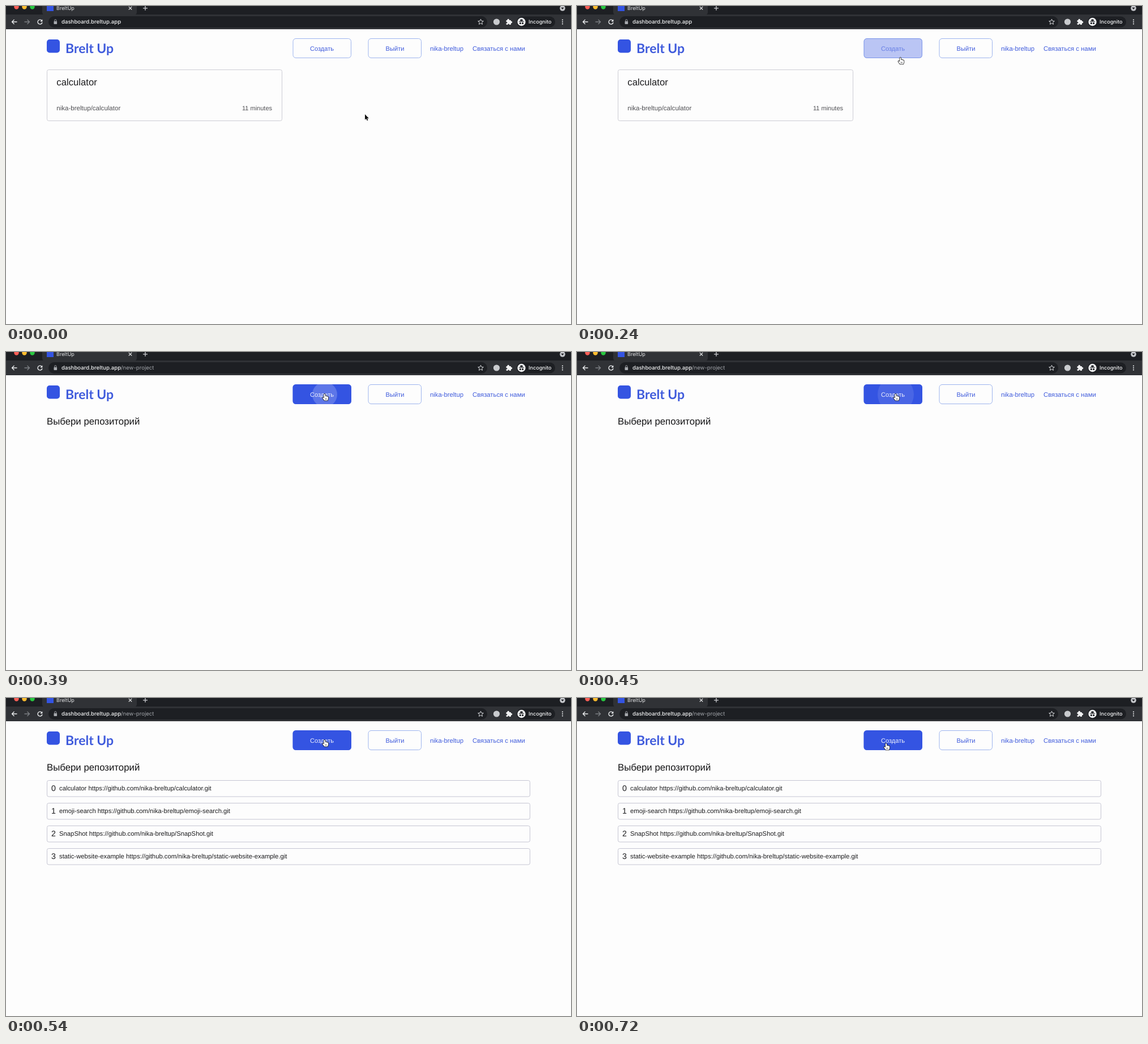
These frames come from a looping animation (998 by 561 pixels, 0.75 s). An HTML page with a canvas:

```html
<!DOCTYPE html>
<html lang="ru">
<head>
<meta charset="utf-8">
<title>Dashboard</title>
<style>
html, body { margin: 0; width: 100%; height: 100%; overflow: hidden; background: #fdfdfd; }
canvas { display: block; }
</style>
</head>
<body>
<canvas id="stage" width="998" height="561"></canvas>
<script>
const ctx = document.getElementById('stage').getContext('2d');
ctx.textRendering = 'geometricPrecision';

const LOOP = 750, STEP = 30;
const HOVER = 240, PRESS = 330, NAVIGATE = 360, LOADED = 540;
const BLUE = '#3454e2', LINK = '#3f5bdc', PAGE = '#fdfdfd';
const SANS = '"Liberation Sans", Arial, sans-serif';
const UI = 'Inter, Roboto, sans-serif';

// Pointer hot spot: time, x, y
const PATH = [
  [0, 634, 191], [150, 590, 136], [270, 565, 76], [300, 564, 74],
  [390, 563, 74], [540, 563, 74], [720, 546, 80], [750, 546, 80]
];
const REPOS = ['calculator', 'emoji-search', 'SnapShot', 'static-website-example'];
const OWNER = 'nika-breltup';

const clamp = v => Math.max(0, Math.min(1, v));
const progress = (t, from, to) => clamp((t - from) / (to - from));

function text(str, x, y, size, color, { family = SANS, weight = 400, align = 'left' } = {}) {
  ctx.font = `${weight} ${size}px ${family}`;
  ctx.textAlign = align;
  ctx.fillStyle = color;
  ctx.fillText(str, x, y);
}

function box(x, y, w, h, r, fill, stroke) {
  ctx.beginPath();
  ctx.roundRect(x, y, w, h, r);
  if (fill) { ctx.fillStyle = fill; ctx.fill(); }
  if (stroke) { ctx.strokeStyle = stroke; ctx.lineWidth = 1; ctx.stroke(); }
}

function disc(x, y, r, fill) {
  ctx.beginPath();
  ctx.arc(x, y, r, 0, Math.PI * 2);
  ctx.fillStyle = fill;
  ctx.fill();
}

function line(d, x, y, color, width = 1.3) {
  ctx.save();
  ctx.translate(x, y);
  ctx.strokeStyle = color;
  ctx.lineWidth = width;
  ctx.stroke(new Path2D(d));
  ctx.restore();
}

function shape(d, x, y, fill) {
  ctx.save();
  ctx.translate(x, y);
  ctx.fillStyle = fill;
  ctx.fill(new Path2D(d));
  ctx.restore();
}

function drawTabs() {
  ctx.fillStyle = '#1d1f23';
  ctx.fillRect(0, 0, 998, 16);
  box(64, -10, 167, 26, 5, '#303236');
  ['#fe5f57', '#febc2e', '#28c840'].forEach((color, i) => disc(18.5 + 14 * i, 1.5, 4.2, color));
  ctx.fillStyle = BLUE;
  ctx.fillRect(72, -2, 12, 11);
  text('BreltUp', 89, 6.5, 9, '#e4e5e7', { family: UI });
  line('M-2.7-2.7L2.7 2.7M2.7-2.7L-2.7 2.7', 219.5, 3.8, '#e4e5e7', 1.2);
  line('M-4 0H4M0-4V4', 246, 3.8, '#d0d2d5');
  disc(983, 4, 4.8, '#c4c6ca');
  shape('M-2.6-1.2H2.6L0 2Z', 983, 4, '#1d1f23');
}

function drawToolbar(t) {
  ctx.fillStyle = '#303236';
  ctx.fillRect(0, 15, 998, 26);
  box(75, 18, 775, 20, 10, '#1d1f23');
  line('M5 0H-4M0-4L-4 0L0 4', 14.5, 28, '#eceef0');
  line('M-5 0H4M0-4L4 0L0 4', 37.5, 28, '#7c7f84');
  line('M3.2-2.4A4 4 0 1 0 4 1', 60, 28, '#eceef0', 1.4);
  shape('M4.4-4.6V-.6H.4Z', 60, 28, '#eceef0');
  box(84.5, 27, 5.6, 5, .7, '#a6a9ae');
  line('M-1.6 0V-1.6A1.6 1.6 0 0 1 1.6-1.6V0', 87.3, 27, '#a6a9ae', 1);

  text('dashboard.breltup.app', 98, 31.4, 9.65, '#f2f3f4', { family: UI, weight: 500 });
  if (t >= NAVIGATE) text('/new-project', 203, 31.4, 9.6, '#a2a5aa', { family: UI });

  line('M0-4.8L1.4-1.6L4.8-1.3L2.2 .9L3 4.3L0 2.5L-3 4.3L-2.2 .9L-4.8-1.3L-1.4-1.6Z', 838.5, 28, '#d5d7da', 1);
  disc(866.5, 28, 5.6, '#c9cbce');
  box(883.5, 25, 8.5, 8, 1, '#f0f1f2');
  disc(887.2, 24.5, 1.8, '#f0f1f2');
  disc(892.4, 28.6, 1.8, '#f0f1f2');
  disc(884, 29.2, 1.3, '#303236');
  disc(887.7, 32.8, 1.3, '#303236');

  box(902, 18.5, 68, 19, 9.5, '#1d1f23');
  disc(910.5, 28, 7.2, '#f1f2f3');
  shape('M-2.5-1.6L-1.8-4.4H1.8L2.5-1.6ZM-4.6-1.2H4.6V-.2H-4.6Z', 910.5, 28, '#202226');
  disc(908.4, 30.4, 1.6, '#202226');
  disc(912.6, 30.4, 1.6, '#202226');
  text('Incognito', 923, 31.3, 9.1, '#f2f3f4', { family: UI, weight: 500 });
  [-3.5, 0, 3.5].forEach(dy => disc(983, 28 + dy, 1.1, '#eceef0'));
}

function drawCreateButton(t) {
  const hover = progress(t, HOVER - STEP, 300);
  const centered = { align: 'center' };
  box(507, 57.5, 102.5, 34, 5, null, '#9db4ee');
  text('Создать', 558, 78.5, 11.1, LINK, centered);
  if (!hover) return;

  ctx.save();
  ctx.globalAlpha = hover;
  box(506.5, 57, 103.5, 35, 5.5, BLUE);
  ctx.clip();
  if (t >= PRESS && t < 510) {
    ctx.globalAlpha = 0.2 * (1 - progress(t, 390, 510));
    disc(563, 75, 8 + 14 * progress(t, PRESS, 390) + 20 * progress(t, 390, 510), '#fff');
  }
  ctx.globalAlpha = hover;
  text('Создать', 558, 78.5, 11.1, '#eef1fd', centered);
  ctx.restore();
}

function drawHeader(t) {
  box(72, 59, 23, 23.5, 5, BLUE);
  text('Brelt Up', 105, 82.5, 23, LINK, { family: 'Lato, sans-serif', weight: 700 });
  drawCreateButton(t);
  box(640, 57.5, 93.5, 34, 5, null, '#9db4ee');
  text('Выйти', 687, 78.5, 11.2, LINK, { align: 'center' });
  text(OWNER, 749, 78.5, 11.3, LINK);
  text('Связаться с нами', 824, 78.5, 11.3, LINK);
}

function drawProject() {
  box(72.5, 112.5, 415, 90, 3, null, '#ccccd4');
  text('calculator', 89.3, 140, 16.7, '#1d1d1f');
  text(OWNER + '/calculator', 89.3, 183.7, 11.55, '#505054');
  text('11 minutes', 470, 183.7, 11, '#505054', { align: 'right' });
}

function drawRepos(t) {
  text('Выбери репозиторий', 72, 128.3, 16.8, '#141416');
  if (t < LOADED) return;
  REPOS.forEach((name, i) => {
    const y = 145 + 40.1 * i;
    box(72.5, Math.round(y) + .5, 853, 28.5, 3, null, '#c5c5d2');
    text(String(i), 80, y + 19, 14.2, '#1d1d1f');
    text(`${name} https://github.com/${OWNER}/${name}.git`, 94, y + 18, 11.3, '#1d1d1f');
  });
}

function pointerAt(t) {
  const i = PATH.findIndex(([time]) => time > t);
  const [t0, x0, y0] = PATH[i - 1], [t1, x1, y1] = PATH[i];
  const k = progress(t, t0, t1);
  return [x0 + (x1 - x0) * k, y0 + (y1 - y0) * k];
}

function drawPointer(t) {
  const arrow = 'M0 0V9.8L2.2 7.8L3.8 11.2L5.4 10.4L3.9 7.2H7Z';
  const hand = 'M-1.1 .8Q0-.8 1.1 .8V4Q2.2 3.2 3 4.4Q4 3.6 4.8 4.8Q6.2 4.4 6.2 6V8.4L5 11.6H-.6L-3.6 7.4Q-4.2 5.8-2.8 5.9L-1.1 7.2Z';
  const [x, y] = pointerAt(t);
  if (t < HOVER) {
    line(arrow, x, y, '#fff', 1.4);
    shape(arrow, x, y, '#111');
  } else {
    line(hand, x, y, '#111', 1.5);
    shape(hand, x, y, '#fff');
    line('M1.1 7.6V10M3 7.6V10', x, y, '#222', .7);
  }
}

function draw(t) {
  ctx.fillStyle = PAGE;
  ctx.fillRect(0, 0, 998, 561);
  drawTabs();
  drawToolbar(t);
  drawHeader(t);
  if (t < NAVIGATE) drawProject();
  else drawRepos(t);
  drawPointer(t);
}

const start = performance.now();
function tick() {
  const elapsed = (performance.now() - start) % LOOP;
  draw(Math.floor(elapsed / STEP) * STEP);
  requestAnimationFrame(tick);
}
tick();
</script>
</body>
</html>
```
